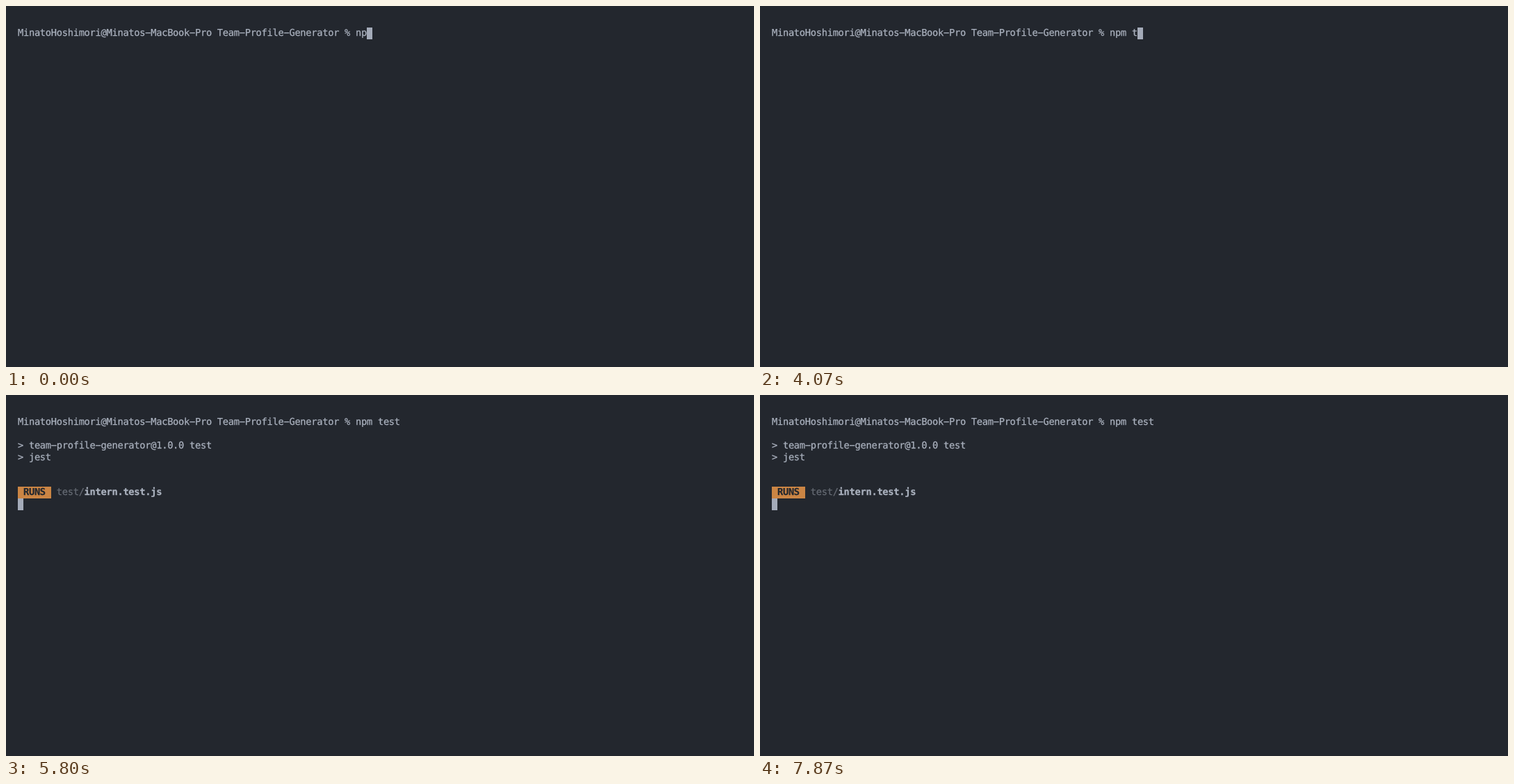
An HTML page with a canvas that plays this animation: 1076 px wide and 520 px high, repeating every 8000 ms.

```html
<!DOCTYPE html>
<html lang="en">
<head>
<meta charset="utf-8">
<title>Terminal test run</title>
<style>
  html, body { margin: 0; width: 100%; height: 100%; overflow: hidden; background: #23272e; }
  canvas { display: block; }
</style>
</head>
<body>
<canvas id="stage" width="1076" height="520"></canvas>
<script>
const ctx = document.getElementById('stage').getContext('2d');
const LOOP = 8000;
const LEFT = 17, TOP = 31, CELL = 7.968, LINE = 16.9, BASELINE = 12;
const BG = '#23272e', FG = '#abb2bf', DIM = '#666b74', CURSOR = '#a4abb9', ORANGE = '#cb8544';
const FONT = '13.7px "DejaVu Sans Mono", monospace';
const PROMPT = 'MinatoHoshimori@Minatos-MacBook-Pro Team-Profile-Generator % ';

// [start in ms, typed command]
const typing = [
  [0, 'np'], [130, 'npm'], [270, 'npm '], [3230, 'npm t'], [3800, 'npm '],
  [4070, 'npm t'], [4130, 'npm te'], [4200, 'npm tes'], [4300, 'npm test']
];
const ENTER = 4470, OUTPUT = 5000, RUNS = 5800;

const colX = col => Math.round(LEFT + col * CELL);
const rowY = row => Math.round(TOP + row * LINE);

function fillCells(row, col, count, color) {
  ctx.fillStyle = color;
  ctx.fillRect(colX(col), rowY(row), colX(col + count) - colX(col), rowY(row + 1) - rowY(row));
}

function print(row, col, text, color = FG, weight = 'normal') {
  ctx.font = `${weight} ${FONT}`;
  ctx.fillStyle = ctx.strokeStyle = color;
  ctx.lineWidth = 0.25; // slightly heavier strokes, like smoothed terminal type
  const y = Math.round(TOP + BASELINE + row * LINE);
  const glyphs = text.replaceAll('-', '\u2212'); // wide hyphens
  [...glyphs].forEach((glyph, i) => {
    const x = LEFT + (col + i) * CELL;
    ctx.fillText(glyph, x, y);
    ctx.strokeText(glyph, x, y);
  });
}

function cursorAt(t, command) {
  if (t < ENTER) return [0, PROMPT.length + command.length];
  if (t < OUTPUT) return [1, 0];
  return [t < RUNS ? 5 : 7, 0];
}

function draw(t) {
  ctx.fillStyle = BG;
  ctx.fillRect(0, 0, 1076, 520);
  ctx.textRendering = 'geometricPrecision';

  const command = typing.filter(([start]) => start <= t).pop()[1];
  print(0, 0, PROMPT + command);

  if (t >= OUTPUT) {
    print(2, 0, '> team-profile-generator@1.0.0 test');
    print(3, 0, '> jest');
  }
  if (t >= RUNS) {
    fillCells(6, 0, 6, ORANGE);
    print(6, 1, 'RUNS', BG, 'bold');
    print(6, 7, 'test/', DIM);
    print(6, 12, 'intern.test.js', FG, 'bold');
  }
  fillCells(...cursorAt(t, command), 1, CURSOR);
}

const startTime = performance.now();
function tick() {
  draw((performance.now() - startTime) % LOOP);
  requestAnimationFrame(tick);
}
tick();
</script>
</body>
</html>
```
